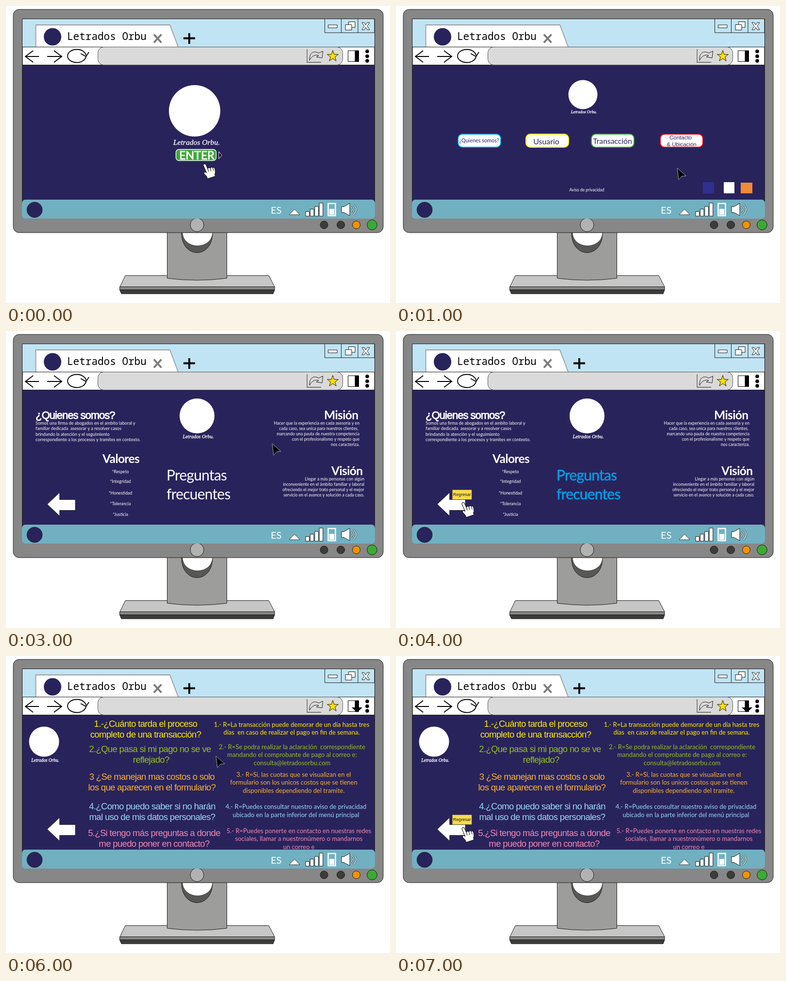
An HTML page with a canvas for the animation above (8 s loop, 792 by 612 pixels).

```html
<!DOCTYPE html>
<html lang="es">
<head>
<meta charset="utf-8">
<title>Letrados Orbu</title>
<style>
html, body { margin: 0; width: 100%; height: 100%; overflow: hidden; background: #fff; }
canvas { display: block; }
</style>
</head>
<body>
<canvas id="stage" width="792" height="612"></canvas>
<script>
const ctx = document.getElementById('stage').getContext('2d');
const STEP = 1000, STEPS = 8;
const NAVY = '#29235c', INK = '#1d1d1b', BLUE = '#009fe3', GREEN = '#3aaa35', WHITE = '#fff', TEAL = '#71b0c1';
const LATO = 'Lato, sans-serif', ARIAL = '"Liberation Sans", sans-serif';
const FIRM = 'Letrados Orbu';

function paint(fill, stroke, width = 1) {
  if (fill) { ctx.fillStyle = fill; ctx.fill(); }
  if (stroke) { ctx.strokeStyle = stroke; ctx.lineWidth = width; ctx.stroke(); }
}

function box(x1, y1, x2, y2, fill, stroke, width, radius = 0) {
  ctx.beginPath();
  ctx.roundRect(x1, y1, x2 - x1, y2 - y1, radius);
  paint(fill, stroke, width);
}

function disc(x, y, r, fill, stroke, width) {
  ctx.beginPath();
  ctx.arc(x, y, r, 0, Math.PI * 2);
  paint(fill, stroke, width);
}

function shape(d, fill, stroke, width, x = 0, y = 0) {
  const path = new Path2D(d);
  ctx.save();
  ctx.translate(x, y);
  if (fill) { ctx.fillStyle = fill; ctx.fill(path); }
  if (stroke) { ctx.strokeStyle = stroke; ctx.lineWidth = width || 1; ctx.stroke(path); }
  ctx.restore();
}

function label(str, x, y, size, color, { align = 'left', family = LATO, style = '', track = 0, stroke = 0 } = {}) {
  ctx.font = `${style} ${size}px ${family}`;
  ctx.textAlign = align;
  ctx.letterSpacing = track + 'px';
  ctx.fillStyle = color;
  ctx.fillText(str, x, y);
  if (stroke) {
    ctx.strokeStyle = color;
    ctx.lineWidth = stroke;
    ctx.strokeText(str, x, y);
  }
  ctx.letterSpacing = '0px';
}

function lines(rows, x, y, gap, size, color, options) {
  rows.forEach((row, i) => label(row, x, y + i * gap, size, color, options));
}

function emblem(x, y, r, nameX, nameY, size) {
  disc(x, y, r, WHITE);
  label(FIRM + '.', nameX, nameY, size, WHITE,
    { align: 'center', family: '"Liberation Serif", serif', style: 'italic', stroke: 0.3 });
}

const hand = (x, y) => shape(
  'M0.5 3C0 -1 5 -1 6 2L9.5 10C11 7 14 7 15 9C16 6 19 6 20 8C22 6 24 8 24.5 11' +
  'L25.5 18L24 21L25.5 25L9 30.5L7.5 26L2 20C1 17 4 15 6.5 18L7 18Z' +
  'M9.5 10L11.5 16M15 9L16.5 15M20 8L21.5 14', WHITE, INK, 1.1, x, y);

const pointer = (x, y) => shape('M1 1L19 17L10 18L4 25Z', '#000', '#b5b5c0', 0.9, x, y);

function tip(str, x1, y1, x2, y2, size) {
  box(x1, y1, x2, y2, '#fadb4b', '#b9a23c', 0.6);
  label(str, (x1 + x2) / 2, y1 + 12, size, INK, { align: 'center', family: ARIAL });
}

function returnArrow() {
  shape('M85 357L110.5 333V347.5H143V369.5H110.5V381Z', WHITE, INK, 0.8);
}

function monitor() {
  shape('M246 555.5H542L554 578.5H235Z', '#c6c6c6', INK);
  box(234.5, 578.5, 554, 585, '#878787', INK);
  shape('M234.5 585H554L551 593H238Z', '#3c3c3b', INK);
  shape('M332.5 460V561Q394 569 455.5 561V460Z', '#9d9d9c', INK);
  shape('M362 467C362 522 426 522 426 467Z', '#575756', INK);
  shape('M364 467C366 503 424 503 426 467Z', WHITE, INK, 0.6);
  box(15, 7, 778, 467, '#878787', INK, 1, 12);
  box(33.5, 26.5, 760.5, 410, NAVY, INK);
  disc(394, 451, 14, '#b2b2b2', INK);
  disc(656, 451, 8, '#3c3c3b', INK);
  disc(690.5, 451, 8, '#3c3c3b', INK);
  disc(722.5, 451, 8, '#f39200', INK);
  disc(755, 451, 10.3, GREEN, INK);
}

function starPath() {
  ctx.beginPath();
  for (let i = 0; i < 10; i++) {
    const a = i * Math.PI / 5 - Math.PI / 2, r = i % 2 ? 4.8 : 12;
    ctx.lineTo(674 + r * Math.cos(a), 103.5 + r * Math.sin(a));
  }
  ctx.closePath();
}

function browser(showPlus, download) {
  box(34, 27, 760, 84, '#c0e4f4');
  box(34, 84.5, 760, 121.5, WHITE, INK);
  shape('M61.5 84V39H338L355 84', WHITE, '#9d9d9c', 1.8);
  disc(96, 63.5, 18, NAVY);
  label(FIRM, 126, 70, 21, '#000', { family: '"Noto Sans Mono", monospace' });
  shape('M305 58.5L320.5 75.5M320.5 58.5L305 75.5', null, '#7c7c7b', 4);
  if (showPlus) shape('M366 66.5H390M378 56V78', null, '#000', 4);

  box(657.5, 26.5, 760, 55, '#c0e4f4', INK);
  shape('M691.5 27V55M726 27V55', null, INK);
  box(664.5, 39, 683, 45, WHITE, INK);
  box(706.5, 32.5, 720, 44, WHITE, INK);
  box(700, 38.5, 713, 49.5, WHITE, INK);
  shape('M734 34H739L742 39L745 34H750L745 41.5L750 49H745L742 44L739 49H734L739 41.5Z', WHITE, INK);

  shape('M68 104H40M56 92L40 104L56 116M85 104H115M99 92L115 104L99 116', null, '#000', 1.8);
  ctx.beginPath();
  ctx.ellipse(146, 103, 19, 13.5, 0, 0.05, Math.PI * 2 - 0.1);
  paint(null, '#000', 1.8);
  shape('M154 98L165 104L171 95', null, '#000', 1.8);

  box(189.5, 84.5, 694.5, 121.5, '#dadada', '#575756', 1, 12);
  shape('M621 89V116H650', null, '#575756', 1.3);
  shape('M626 112C625 97 634 91 645 97L653.5 93L652 107L640 105L645 102C637 99 630 104 626 112Z', '#dadada', INK);
  starPath();
  paint('#ffde00', INK);

  box(705.5, 92, 727.5, 114.5, WHITE, '#000');
  box(719.5, 92, 728, 115, '#000');
  if (download) shape('M713 106H735L724 116Z', '#000');
  [93.5, 103.5, 113].forEach(y => disc(745, y, 3.8, '#000'));
}

function taskbar() {
  box(33, 399, 761, 438, TEAL, null, 1, 7);
  disc(59, 420, 16, NAVY, INK, 0.7);
  label('ES', 546, 427.5, 20, WHITE);
  shape('M584 430L595 418.5L606 430Z', WHITE, INK, 0.8);
  [423.5, 418.5, 413, 406].forEach((top, i) => {
    const x = 618 + i * 9.4;
    box(x, top, x + 7.5, 433, WHITE, INK);
  });
  box(664.5, 407, 679.5, 432, TEAL, WHITE, 2.6);
  box(667, 418, 677, 430, WHITE);
  shape('M692 413.5H697L709 406.5V432L697 425.5H692Z', WHITE, INK);
  ['M711 414Q717 419 711 425', 'M716 409Q728 419 716 430'].forEach(d => {
    shape(d, null, INK, 2.8);
    shape(d, null, WHITE, 1.5);
  });
}

function welcomePage() {
  emblem(389, 216, 53, 393, 285.5, 15.6);
  box(350.5, 295.5, 433.5, 318.5, GREEN, WHITE, 1.4, 6);
  label('ENTER', 393.5, 315.5, 23.2, WHITE, { align: 'center', stroke: 0.9 });
  shape('M439 300L445 307.5L439 315Z', '#000', WHITE, 1);
  hand(406.5, 325.5);
}

function menuPage(hover) {
  emblem(385.5, 182.5, 30, 387.5, 221, 8.7);
  const button = (x, border, fill = WHITE) => box(x + 1, 264, x + 89, 291, fill, border, 2, 9);
  const centered = { align: 'center' };
  button(127, hover ? WHITE : BLUE, hover ? BLUE : WHITE);
  button(267, '#ffed00');
  button(402, GREEN);
  button(544, '#e30613');
  label('¿Quienes somos?', 171.5, 281, 10.9, hover ? WHITE : NAVY, centered);
  label('Usuario', 310, 285, 15.9, NAVY, centered);
  label('Transacción', 446.5, 283.5, 15.7, NAVY, centered);
  label('Contacto', 587, 275, 11.5, NAVY, { align: 'center', family: ARIAL });
  label('& Ubicación', 589, 289, 11.5, NAVY, { align: 'center', family: ARIAL });
  label('Aviso de privacidad', 393.5, 382, 8.5, WHITE, centered);
  box(633, 363, 656, 386, '#312f8f');
  box(676, 363, 698, 386, WHITE);
  box(711, 364, 735, 386, '#f18a35');
  if (hover) {
    tip('Haz clic aquí', 153.5, 236.5, 209, 255.5, 9.3);
    hand(183, 291.5);
  } else {
    pointer(579, 333);
  }
}

function aboutPage(hover) {
  const heading = { style: 'bold', track: -0.6 };
  const right = { align: 'right' };
  emblem(394, 175, 36, 396.5, 221, 10.4);
  label('¿Quienes somos?', 61, 180.5, 22, WHITE, { family: ARIAL, track: -1, stroke: 0.9 });
  lines([
    'Somos una firma de abogados en el ambito laboral y',
    'familiar dedicada  asesorar y a resolver casos',
    'brindando la atención y el seguimiento',
    'correspondiente a los procesos y tramites en contexto.'
  ], 61, 193, 11.4, 9.05, WHITE);

  label('Valores', 199, 272, 24.5, WHITE, heading);
  [['Respeto', 293], ['Integridad', 313], ['Honestidad', 337], ['Tolerancia', 358.5], ['Justicia', 380.5]]
    .forEach(([word, y]) => label('*' + word, 236, y, 8.8, WHITE, { align: 'center' }));

  label('Misión', 656, 182, 24.5, WHITE, heading);
  lines([
    'Hacer que la experiencia en cada asesoria y en',
    'cada caso, sea unica para nuestros clientes, ',
    'marcando una pauta de nuestra competencia',
    'con el profesionalismo y respeto que',
    'nos caracteriza.'
  ], 729, 192.5, 11, 8.7, WHITE, right);
  label('Visión', 671, 297, 24.5, WHITE, heading);
  lines([
    'Llegar a más personas con algún',
    'inconveniente en el ámbito familiar y laboral',
    'ofreciendo el mejor trato personal y el mejor',
    'servicio en el avance y solución a cada caso.'
  ], 739, 307.5, 11.2, 8.7, WHITE, right);

  lines(['Preguntas', 'frecuentes'], 331, 307.5, 39, 30, hover ? BLUE : WHITE,
    { track: -0.8, stroke: hover ? 0.6 : 0 });
  returnArrow();
}

function returnHover() {
  tip('Regresar', 116.5, 327.5, 156, 347, 9);
  hand(135.5, 353.5);
}

const FAQ = [
  { color: '#ffed00', qx: 288, qy: 146, ax: 589, ay: 146,
    q: ['1.-¿Cuánto tarda el proceso', 'completo de una transacción?'],
    a: ['1.- R=La transacción puede demorar de un día hasta tres',
        'días  en caso de realizar el pago en fin de semana.'] },
  { color: '#95c11f', qx: 297, qy: 197.5, ax: 590, ay: 192,
    q: ['2.¿Que pasa si mi pago no se ve', ' reflejado?'],
    a: ['2.- R=Se podra realizar la aclaración  correspondiente',
        'mandando el comprobante de pago al correo e:', 'consulta@letradosorbu.com'] },
  { color: '#f9b233', qx: 301, qy: 255, ax: 593.5, ay: 249,
    q: ['3 ¿Se manejan mas costos o solo', 'los que aparecen en el formulario?'],
    a: ['3.- R=Si, las cuotas que se visualizan en el',
        'formulario son los unicos costos que se tienen', 'disponibles dependiendo del tramite.'] },
  { color: '#9bd8f5', qx: 301.5, qy: 316, ax: 598, ay: 315.5,
    q: ['4.¿Como puedo saber si no harán', 'mal uso de mis datos personales?'],
    a: ['4.- R=Puedes consultar nuestro aviso de privacidad',
        'ubicado en la parte inferior del menú principal'] },
  { color: '#f088b4', qx: 305.5, qy: 370.5, ax: 604, ay: 365,
    q: ['5.¿Si tengo más preguntas a donde', 'me puedo poner en contacto?'],
    a: ['5.- R=Puedes ponerte en contacto en nuestras redes',
        'sociales, llamar a nuestronúmero o mandarnos', 'un correo e'] }
];

function faqPage() {
  emblem(78.5, 176.5, 31, 81, 218, 9.3);
  for (const { color, q, qx, qy, a, ax, ay } of FAQ) {
    lines(q, qx, qy, 22.3, 18.5, color, { align: 'center', family: ARIAL, track: -0.65 });
    lines(a, ax, ay - 0.5, 16.6, 13, color, { align: 'center' });
  }
  returnArrow();
}

const scenes = [
  () => welcomePage(),
  () => menuPage(false),
  () => menuPage(true),
  () => { aboutPage(false); pointer(548, 231); },
  () => { aboutPage(true); returnHover(); },
  () => { aboutPage(true); hand(437, 348.5); },
  () => { faqPage(); pointer(432, 205); },
  () => { faqPage(); returnHover(); }
];

function draw() {
  const step = Math.floor(performance.now() / STEP) % STEPS;
  ctx.fillStyle = WHITE;
  ctx.fillRect(0, 0, 792, 612);
  monitor();
  browser(step !== 1 && step !== 2, step >= 6);
  scenes[step]();
  taskbar();
  requestAnimationFrame(draw);
}
draw();
</script>
</body>
</html>
```
